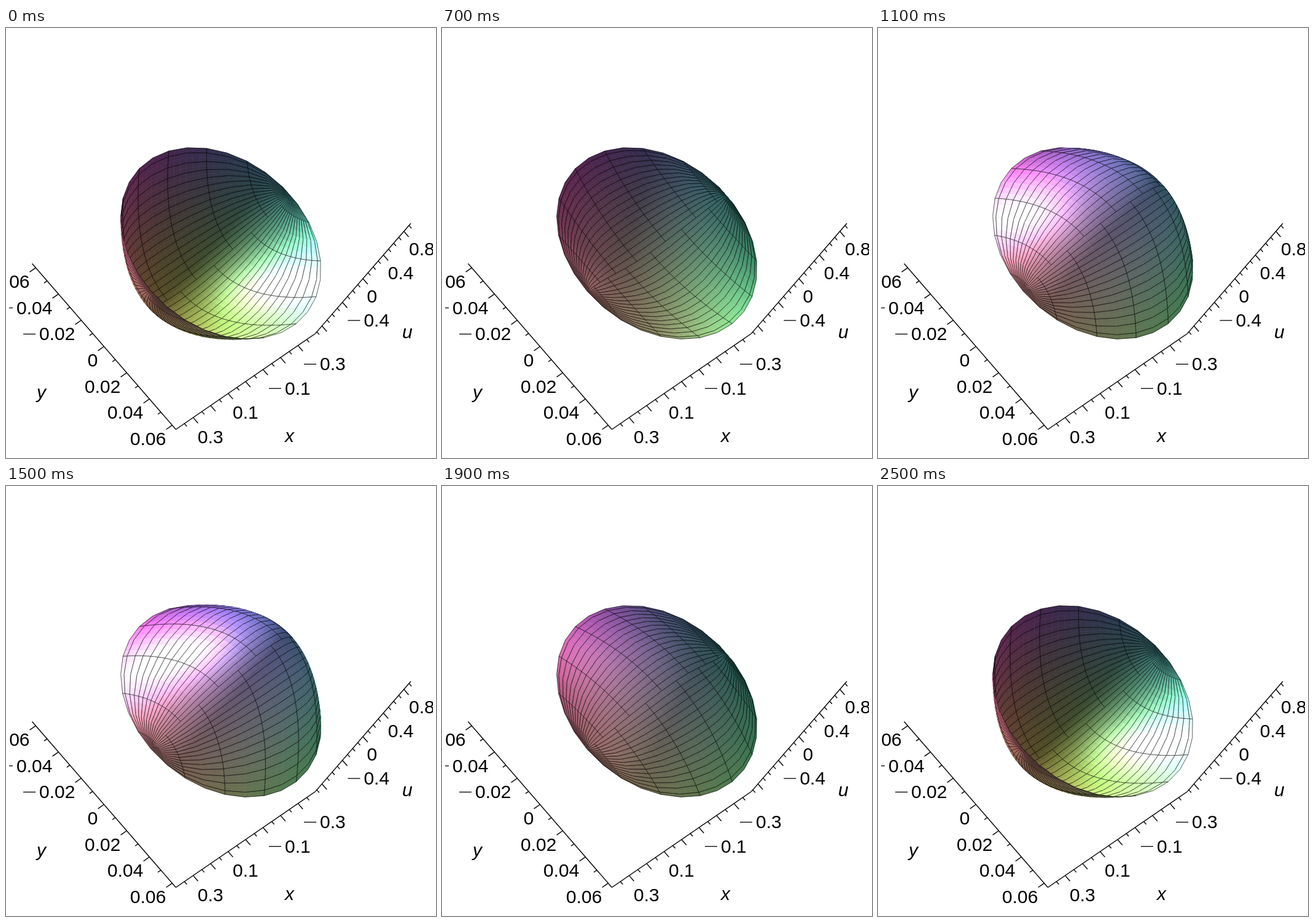
These frames come from a looping animation (700x700 px, 2.6 s). An HTML page with a canvas:

```html
<!DOCTYPE html>
<html lang="en">
<head>
<meta charset="utf-8">
<title>Vibrating elliptical membrane</title>
<style>
  html, body { margin: 0; width: 100%; height: 100%; overflow: hidden; background: #fff; }
  canvas, svg { position: absolute; left: 0; top: 0; width: 700px; height: 700px; }
  text { font: 30px "Liberation Sans", Arial, sans-serif; fill: #000; }
  .name { font-style: italic; }
  line { stroke: #000; stroke-width: 1.4; }
  .minus { stroke-width: 1.3; }
</style>
</head>
<body>
<canvas id="surface" width="700" height="700"></canvas>
<svg viewBox="0 0 700 700">
  <clipPath id="window"><rect x="5" y="0" width="690" height="700"/></clipPath>
  <g id="axes" clip-path="url(#window)"></g>
</svg>
<script>
const STEP = 100, FRAMES = 26, PERIOD = 25;
const CELLS = 31, SPLIT = 3, RIM = 0.1594;
const CENTER = [349.8, 350.5, 0];

// Screen x, screen y and depth of each half side of the plot box
const HX = [-113.5, 78, 116], HY = [117, 135, 22], HU = [77.5, -89.5, 135.5];
const VIEW = [0.644, 0.122, 0.753];
const LIGHT = [0.21, -0.97, 0.1];
const SHINE = [0.58, -0.6, 0.56];

const ctx = document.getElementById('surface').getContext('2d');
const dot = (a, b) => a[0] * b[0] + a[1] * b[1] + a[2] * b[2];
const mix = (a, b, f) => a.map((v, i) => v + (b[i] - v) * f);

// Grid of elliptic coordinates, normalised to the unit disc
const grid = [];
for (let j = 0; j <= CELLS; j++) {
  const m = RIM * j / CELLS, row = [];
  for (let k = 0; k <= CELLS; k++) {
    const v = 2 * Math.PI * k / CELLS;
    row.push([Math.cosh(m) / Math.cosh(RIM) * Math.cos(v),
              Math.sinh(m) / Math.sinh(RIM) * Math.sin(v)]);
  }
  grid.push(row);
}

// The membrane is a dome times (dome + wave * x^2); both parts swing out of phase
const swing = (step, peak) => Math.cos(2 * Math.PI * (step - peak) / PERIOD);
const shapeAt = step => ({ dome: swing(step, 14.1), wave: 0.35 * swing(step, 9) });
const height = (x, y, s) => (1 - x * x - y * y) * (s.dome + s.wave * x * x);

function normal(x, y, s) {
  const gain = s.dome + s.wave * x * x;
  const n = [2 * x * (gain - s.wave * (1 - x * x - y * y)), 2 * y * gain, 1];
  const len = Math.hypot(...n) * (dot(n, VIEW) < 0 ? -1 : 1);
  return n.map(v => v / len);
}

function project([x, y, u]) {
  return CENTER.map((c, i) => c + HX[i] * x + HY[i] * y + HU[i] * u);
}

function shade([x, y, u], shape) {
  const n = normal(x, y, shape);
  const diffuse = 1 + 1.8 * Math.max(0, dot(n, LIGHT));
  const gloss = 130 * Math.max(0, dot(n, SHINE)) ** 12;
  const rgb = [x, y, u].map(v =>
    Math.min(255, Math.round((36 + 43 * (1 + v)) * diffuse + gloss)));
  return `rgb(${rgb})`;
}

function edge(a, b) {
  ctx.beginPath();
  ctx.moveTo(a[0], a[1]);
  ctx.lineTo(b[0], b[1]);
  ctx.stroke();
}

function drawCell({ j, k, p, q }, shape) {
  const [a, b, c, d] = p;
  ctx.lineWidth = 0.6;
  for (let i = 0; i < SPLIT; i++) {
    const f = i / SPLIT, g = (i + 1) / SPLIT;
    const mid = mix(mix(a, b, (f + g) / 2), mix(d, c, (f + g) / 2), 0.5);
    ctx.fillStyle = ctx.strokeStyle = shade(mid, shape);
    ctx.beginPath();
    for (const r of [mix(q[0], q[1], f), mix(q[0], q[1], g), mix(q[3], q[2], g), mix(q[3], q[2], f)])
      ctx.lineTo(r[0], r[1]);
    ctx.closePath();
    ctx.fill();
    ctx.stroke();
  }
  ctx.lineWidth = 1;
  ctx.strokeStyle = 'rgba(0,0,0,.62)';
  if (j % 2 === 0) edge(q[0], q[1]);
  else edge(q[3], q[2]);
  if (k % 2 === 0) edge(q[0], q[3]);
  else edge(q[1], q[2]);
  if (j === CELLS - 1) edge(q[3], q[2]);
}

function drawSurface(shape) {
  const pts = grid.map(row => row.map(([x, y]) => [x, y, height(x, y, shape)]));
  const flat = pts.map(row => row.map(project));
  const cells = [];
  for (let j = 0; j < CELLS; j++) {
    for (let k = 0; k < CELLS; k++) {
      const corners = m => [m[j][k], m[j][k + 1], m[j + 1][k + 1], m[j + 1][k]];
      const q = corners(flat);
      cells.push({ j, k, p: corners(pts), q, depth: q[0][2] + q[1][2] + q[2][2] + q[3][2] });
    }
  }
  cells.sort((a, b) => a.depth - b.depth);
  ctx.clearRect(0, 0, 700, 700);
  ctx.lineJoin = 'round';
  for (const cell of cells) drawCell(cell, shape);
}

const axes = document.getElementById('axes');
function add(tag, attrs, content) {
  const el = document.createElementNS('http://www.w3.org/2000/svg', tag);
  for (const key in attrs) el.setAttribute(key, attrs[key]);
  if (content) el.textContent = content;
  axes.append(el);
}
function segment(x1, y1, x2, y2, cls = '') {
  add('line', { x1, y1, x2, y2, class: cls });
}

// Ticks run over multiples of step; those accepted by isMajor are long
function ticks(mid, half, range, step, dir, isMajor) {
  const last = Math.floor(range / step);
  for (let i = -last; i <= last; i++) {
    const f = i * step / range, len = isMajor(i) ? 12 : 6;
    const x = mid[0] + half[0] * f, y = mid[1] + half[1] * f;
    segment(x, y, x + dir[0] * len, y + dir[1] * len);
  }
}

// left is the start of the digits, y the middle of the line
function label(value, left, y) {
  add('text', { x: left, y: y + 10.5 }, String(Math.abs(value)));
  if (value < 0) segment(left - 26, y + 0.5, left - 6, y + 0.5, 'minus');
}

function drawAxes() {
  segment(42.5, 383.5, 276.5, 653.5);
  segment(276.5, 653.5, 503.5, 497.5);
  segment(503.5, 497.5, 659, 318);

  const alongX = [-0.82, 0.57], alongY = [0.655, 0.756];
  ticks([159.5, 518.5], HY, 0.0632, 0.01, alongX, i => i % 2 === 0);
  ticks([390, 575.5], HX, 0.399, 0.05, alongY, i => i % 2 === 0);
  ticks([581, 408], HU, 0.93, 0.1, alongY, i => i % 4 === 0);

  for (let i = -3; i <= 3; i++) {
    const right = 149.5 + 37 * i;
    label(i * 0.02, right - (i ? 58.4 : 16.7), 540.5 + 42.7 * i);
  }
  [0.3, 0.1, -0.1, -0.3].forEach((v, i) =>
    label(v, 312 + 57 * i + (v < 0 ? 28 : 0), 665 - 39.4 * i));
  [0.8, 0.4, 0, -0.4].forEach((v, i) =>
    label(v, 656 - 34.2 * i + (v < 0 ? 29 : 0), 359.5 + 38.7 * i));

  add('text', { x: 50, y: 603, class: 'name' }, 'y');
  add('text', { x: 454, y: 673.5, class: 'name' }, 'x');
  add('text', { x: 645, y: 505, class: 'name' }, 'u');
}

let shown = -1;
function render(time) {
  const step = Math.floor(time / STEP) % FRAMES;
  if (step === shown) return;
  shown = step;
  drawSurface(shapeAt(step));
}

drawAxes();
const start = performance.now();
function loop() {
  render(performance.now() - start);
  requestAnimationFrame(loop);
}
loop();
</script>
</body>
</html>
```
